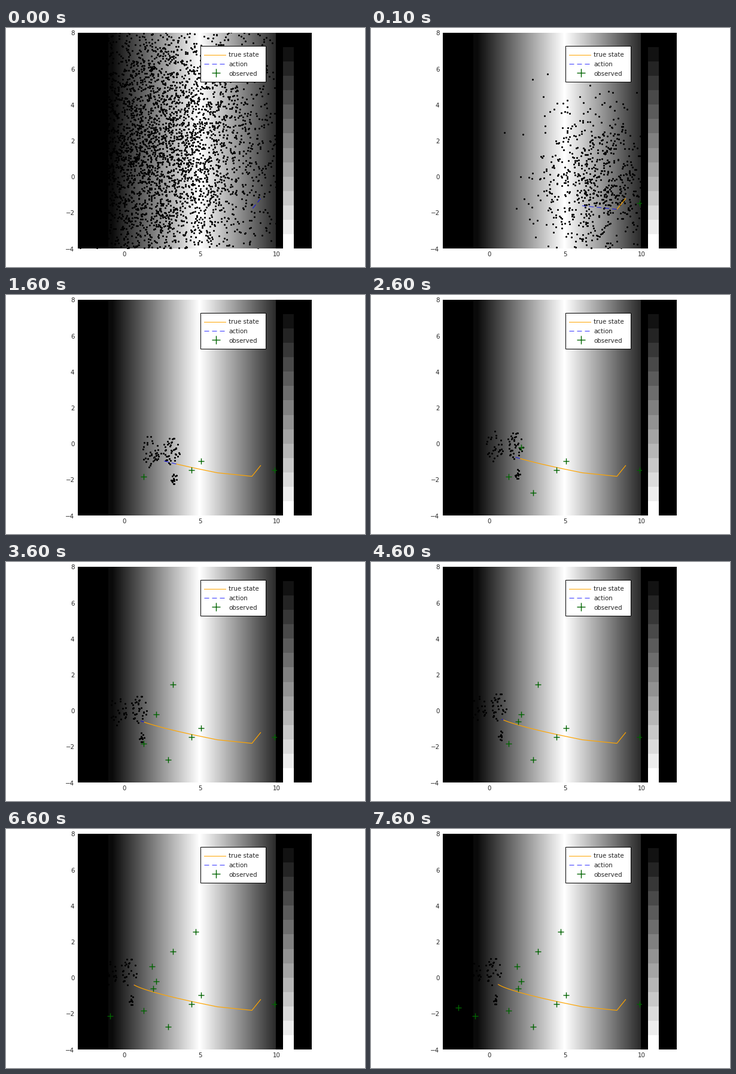
Animation, 600 px wide and 400 px high, one loop 8000 ms. Source, as a matplotlib script:

```python
import numpy as np
import matplotlib.pyplot as plt
from matplotlib.animation import FuncAnimation
from matplotlib.patches import Rectangle

W, H, DPI = 600, 400, 100
PX = 72 / DPI  # points per pixel
LEFT, RIGHT, TOP, BOTTOM = 120.5, 451.5, 8, 369
UX, UY = (RIGHT - LEFT) / 13, (BOTTOM - TOP) / 12
GREEN, BLUE, ORANGE = "#006400", "#0000ff", "#ffa500"
DASH = (0, (8, 5))

plt.rcParams["font.family"] = "DejaVu Sans"
rng = np.random.default_rng(7)


def to_px(x, y):
    """Plot units to stage pixels."""
    return LEFT + (np.asarray(x) + 3) * UX, BOTTOM - (np.asarray(y) + 4) * UY


def gauss(n, mean, sd):
    """Normal cloud given in plot units, returned in pixels."""
    return np.column_stack(to_px(*rng.normal(mean, sd, (n, 2)).T))


def blob(n, center, radius):
    """Points spread evenly over an ellipse."""
    angle, r = rng.uniform(0, 2 * np.pi, n), np.sqrt(rng.uniform(0, 1, n))
    unit = np.column_stack([r * np.cos(angle), r * np.sin(angle)])
    return np.array(center) + unit * radius


# true state: a swing to the left, then a steady approach to its goal
GOAL = np.array([210.5, 258])
decay = np.array([0.72, 0.79]) ** np.arange(16)[:, None]
path = np.vstack([(425, 285), (410.5, 303), GOAL + (142, 39) * decay])

# step at which each observation appears
observed = {
    1: (448, 292), 2: (325, 277), 3: (309, 292), 4: (229, 303),
    5: (270, 330), 6: (250, 254), 7: (278, 204), 9: (245, 266),
    11: (316, 171), 13: (173, 312), 14: (243, 229), 16: (145, 298)}

# particle clouds: wide prior, first update, fan, then groups following the state
prior = gauss(5200, (2, 2), (4, 4.2))
second = gauss(800, (7.2, -0.4), (1.9, 2.3))
cloud = np.vstack([
    blob(48, (-8, -22), (14, 24)), blob(18, (-30, -18), (9, 15)),
    blob(16, (-4, 25), (6, 9)), blob(28, (-46, -21), (11, 26))])
rng.shuffle(cloud)
reach = rng.triangular(0, 8, 105, 290)
sway = rng.triangular(-1, -0.05, 1, 290)
fan = np.column_stack([340 + reach, 280 + sway * (42 + 1.25 * reach)])


def particles(step):
    if step < 2:
        return (prior, second)[step]
    if step == 2:
        return np.vstack([cloud + path[2], fan])
    alive = 58 + int(52 * 0.72 ** (step - 3))
    group = cloud[:alive] + path[step]
    if step == 3:
        group = np.vstack([group, fan[reach < 25] + path[3] - path[2]])
    return group


fig = plt.figure(figsize=(W / DPI, H / DPI), dpi=DPI, facecolor="white")
ax = fig.add_axes([0, 0, 1, 1])
ax.axis("off")


def box(x0, y0, x1, y1, color):
    """Filled box given by its outer pixel edges."""
    ax.add_patch(Rectangle((x0 - 0.5, y0 - 0.5), x1 - x0, y1 - y0,
                           fc=color, lw=0, zorder=1))


def label(x, y, text, ha):
    ax.text(x, y, text, ha=ha, va="center_baseline", fontsize=10.3 * PX,
            color="#262626", zorder=11)


def cross(x, y, size, zorder):
    return ax.plot([x], [y], "+", color=GREEN, ms=size * PX, mew=1.4 * PX,
                   zorder=zorder)[0]


# light map: brightest at x = 5, black where undefined
box(120, TOP, 511, BOTTOM, "black")
light = np.maximum(1 - np.abs(np.linspace(-1, 10, 280) - 5) / 6, 0.04)
ax.imshow(light[None, :], cmap="gray", vmin=0, vmax=1, aspect="auto",
          extent=(170.5, 450.5, BOTTOM - 0.5, TOP - 0.5),
          interpolation="nearest", zorder=2)
bar_step = (BOTTOM - TOP) / 15
for k in range(15):
    y = TOP + k * bar_step
    box(463, round(y), 481, round(y + bar_step), str(k / 14))

for v in (0, 5, 10):
    label(to_px(v, 0)[0], 378, str(v), "center")
for v in range(-4, 9, 2):
    label(114, to_px(0, v)[1], str(v).replace("-", "\u2212"), "right")

# legend
ax.add_patch(Rectangle((324, 29), 109, 60, fc="white", ec="black", lw=PX, zorder=10))
ax.plot([330, 366], [44, 44], color=ORANGE, lw=PX, zorder=11)
ax.plot([330, 366], [59, 59], color=BLUE, lw=PX, ls=DASH, alpha=0.8, zorder=11)
cross(350, 74, 14, 11)
for i, text in enumerate(("true state", "action", "observed")):
    label(372, 44 + 15.5 * i, text, "left")

dots, = ax.plot([], [], "o", color="black", ms=3.1 * PX, mew=0, zorder=3)
trail, = ax.plot([], [], color=ORANGE, lw=1.2 * PX, zorder=4)
action, = ax.plot([], [], color=BLUE, lw=PX, ls=DASH, alpha=0.85, zorder=5)
marks = {s: cross(x, y, 10.5, 6) for s, (x, y) in observed.items()}
clip = Rectangle((LEFT - 0.5, TOP - 0.5), RIGHT - LEFT, BOTTOM - TOP,
                 transform=ax.transData)
for artist in (dots, trail, action, *marks.values()):
    artist.set_clip_path(clip)

# whole numbers fall on pixel centres
ax.set_xlim(-0.5, W - 0.5)
ax.set_ylim(H - 0.5, -0.5)


def draw(frame):
    step = (frame + 4) // 5  # first step lasts one tick, the rest five
    dots.set_data(*particles(step).T)
    trail.set_data(*path[:step + 1].T)
    action.set_data(*path[step:step + 2].T)
    for s, mark in marks.items():
        mark.set_visible(s <= step)
    return [dots, trail, action, *marks.values()]


anim = FuncAnimation(fig, draw, frames=80, interval=100, repeat=True, repeat_delay=0)
plt.show()
```
